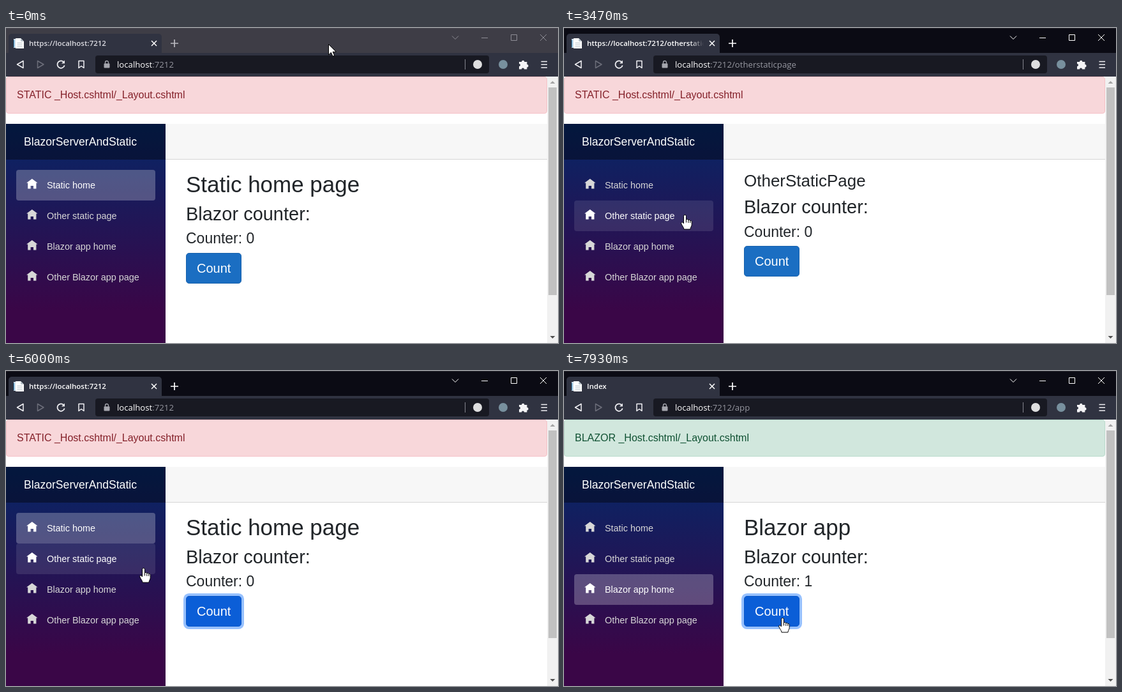
These frames come from a looping animation (865 px wide and 493 px high, 8000 ms). An HTML page:

```html
<!DOCTYPE html>
<html lang="en">
<head>
<meta charset="utf-8">
<title>Static and Blazor pages</title>
<style>
* { box-sizing: border-box; }
html, body { margin: 0; width: 100%; height: 100%; overflow: hidden; background: #fff; }
body { position: relative; font: 16px/1.5 "Liberation Sans", Arial, sans-serif; color: #212529; }
body > *, .tab, .address, .tab span, .address span { position: absolute; white-space: nowrap; }

.titlebar { left: 0; top: 0; width: 865px; height: 39px; background: #0b0b14; border-top: 1px solid #24242c; }
.toolbar { left: 0; top: 39px; width: 865px; height: 37px; background: #303341; }
.tab { left: 4px; top: 9px; width: 240px; height: 30px; border-radius: 5px 5px 0 0; background: #303341; }
.tab, .address { font-family: "Open Sans", "Noto Sans", sans-serif; color: #fff; }
.tab span { left: 32px; width: 183px; overflow: hidden; font-size: 11.5px; font-weight: 600; line-height: 30px;
  -webkit-mask: linear-gradient(90deg, #000 88%, transparent); mask: linear-gradient(90deg, #000 88%, transparent); }
.address { left: 140px; top: 43px; width: 617px; height: 28px; border-radius: 4px; background: #181922; }
.address span { left: 34px; font-size: 13.2px; line-height: 28px; }
.address i { font-style: normal; color: #9697a0; }
.focused { box-shadow: 0 0 0 1px #7c80c8; }
.idle .titlebar { background: #3e3d46; border-color: #4a4952; }
.idle .tab span { color: #dcdce2; }
.idle .caption { stroke: #8e8d95; }
.idle .plus { stroke: #bbbac1; }

.page { left: 0; top: 76px; width: 848px; height: 417px; overflow: hidden; background: #fff; }
.page > * { position: absolute; }
.alert { width: 848px; height: 58px; padding: 16px; border: 1px solid #f5c2c7; border-radius: 4px; background: #f8d7da; color: #842029; }
.alert.blazor { border-color: #badbcc; background: #d1e7dd; color: #0f5132; }
.sidebar { top: 74px; width: 250px; height: 417px; background: linear-gradient(#052767, #3a0647 70%); }
.brand { height: 56px; margin-bottom: 16px; padding-left: 28px; background: rgba(0, 0, 0, .4); color: #fff; font-size: 17.6px; line-height: 56px; }
.link { position: relative; width: 218px; height: 48px; margin-left: 16px; padding-left: 48px; border-radius: 4px; color: #d7d7d7; font-size: 14.4px; line-height: 48px; }
.link svg { position: absolute; left: 16px; top: 14px; width: 17.6px; height: 17.6px; fill: currentColor; }
.link.active { background: rgba(255, 255, 255, .25); color: #fff; }
.link.hover { background: rgba(255, 255, 255, .1); color: #fff; }
.toprow { left: 250px; top: 74px; width: 598px; height: 56px; background: #f7f7f7; border-bottom: 1px solid #d6d5d5; }
article { left: 282px; top: 147.6px; }
article div { margin-bottom: 8px; line-height: 1.2; }
.subtitle { font-size: 28.985px; }
.counter { font-size: 22.995px; }
.count { display: block; height: 48px; padding: 8px 16px; border: 1px solid; border-radius: 4.8px; color: #fff; font: 20px/1.5 "Liberation Sans", Arial, sans-serif; }
.overlay { left: 0; top: 0; }
</style>
</head>
<body>
<div class="titlebar"></div>
<div class="toolbar"></div>
<div class="tab"><span id="tabTitle"></span></div>
<div class="address"><span>localhost<i id="path"></i></span></div>

<main class="page">
  <div class="alert"></div>
  <nav class="sidebar"><div class="brand">BlazorServerAndStatic</div></nav>
  <div class="toprow"></div>
  <article>
    <div class="heading"></div>
    <div class="subtitle">Blazor counter:</div>
    <div class="counter"></div>
    <button class="count">Count</button>
  </article>
</main>

<svg class="overlay" width="865" height="493" fill="none">
  <g id="favicon">
    <path d="M12 17h8v14h-8z" fill="#c9dcea"/>
    <path d="M15 16h8l5 5v11H15z" fill="#fff"/>
    <path d="M23 16v5h5z" fill="#b9c4cc"/>
    <path d="M17.500 23.500h8m-8 3h8m-8 3h8" stroke="#b5bfc7"/>
    <path d="M12.500 19v11" stroke="#4b9ccd"/>
  </g>
  <path d="M228 20l8 8m0-8l-8 8" stroke="#fff" stroke-width="1.500"/>
  <path class="plus" d="M258 24h12m-6-6v12" stroke="#fff" stroke-width="1.700"/>
  <path class="caption" d="M699 12.500l5 5 5-5M745 15.500h10M791.500 10.500h9v9h-9zM837 10l10 10m0-10l-10 10" stroke="#fff"/>
  <g stroke="#f0f0f4" stroke-width="1.500" stroke-linejoin="round">
    <path d="M27 51.500v11l-9.500-5.500z"/>
    <path d="M49.500 51.500v11l9.500-5.500z" stroke="#6c6e7a"/>
    <path d="M91 54a5.700 5.700 0 1 0 .7 4.500" stroke-width="1.800"/>
    <path d="M92 50.500v5h-5z" fill="#f0f0f4" stroke="none"/>
    <path d="M114 51.500h8v11l-4-3-4 3z"/>
    <path d="M838.500 52.500h9.500m-9.500 4.700h9.500m-9.500 4.700h9.500"/>
  </g>
  <path d="M155.500 56v-2a2.500 2.500 0 0 1 5 0v2" stroke="#a5a6ae" stroke-width="1.300"/>
  <rect x="153.500" y="55.500" width="9" height="7" rx="1" fill="#a5a6ae"/>
  <path d="M719.500 49v16" stroke="#85868f"/>
  <circle cx="739" cy="57" r="7" fill="#dededf"/>
  <circle cx="779" cy="57" r="7" fill="#78909e"/>
  <path d="M804 53h4a2.200 2.200 0 1 1 4.400 0h4v4a2.200 2.200 0 1 1 0 4.400v3h-4.400a2 2 0 0 0-4 0h-4v-4.400a2 2 0 0 0 0-4z" fill="#f4f4f6"/>
  <path d="M848 76h17v417h-17z" fill="#f1f1f1"/>
  <path d="M850 93h13v325h-13z" fill="#c1c1c1"/>
  <path d="M852.500 87l4-4 4 4z" fill="#a3a3a3"/>
  <path d="M852.500 482l4 4 4-4z" fill="#505050"/>
  <g id="cursor" stroke-linejoin="round">
    <path id="arrow" d="M0 0v16.500l3.900-3.700 2.600 6 2.700-1.200-2.600-5.800h5.200z" fill="#fff" stroke="#000"/>
    <path id="beam" d="M-3 .5h2.500l.5.500.5-.5h2.500M0 1v16M-3 17.500h2.500l.5-.5.5.5h2.500" stroke="#fff"/>
    <g id="hand" stroke="#000">
      <path d="M-2 2a2 2 0 0 1 4 0v5.500c1-1 3-.8 3.300.8 1-.8 2.800-.5 3 .9 1-.6 2.400 0 2.400 1.500V15c0 3-2 4-2.300 7.500h-9.900C-1.800 19-5 16.500-5.800 13.500c-.6-1.800 1.600-2.800 2.500-1.500l1.300 1.500z" fill="#fff"/>
      <path d="M2 7.500V12M5.300 8.300V12.500M8.300 9.200V12.500"/>
    </g>
  </g>
</svg>

<script>
const LOOP = 8000;
const HOST = "https://localhost:7212";
const find = selector => document.querySelector(selector);

// hover and focus: when the button is entered and clicked on that page
const staticHome = { title: HOST, path: "", heading: "Static home page", size: 34.975, active: 0 };
const pages = [
  { ...staticHome, from: 0, hover: 1990, focus: 2140 },
  { from: 3330, title: HOST + "/otherstaticpage", path: "/otherstaticpage", heading: "OtherStaticPage",
    size: 25.99, active: 1, hover: 3900, focus: 4130 },
  { ...staticHome, from: 4800, hover: 4907, focus: 5490 },
  { from: 6700, title: "Index", path: "/app", heading: "Blazor app", size: 34.975, active: 2,
    hover: 7410, focus: 7690, counted: 7740, blazor: true }
];

// time, x, y of the pointer tip
const track = [
  [130, 505, 25], [470, 430, 54], [1270, 430, 54], [1800, 357, 318], [2070, 338, 370],
  [2200, 338, 370], [2850, 183, 289], [3400, 183, 289], [3980, 318, 362], [4180, 318, 362],
  [4330, 289, 338], [4620, 150, 250], [4700, 150, 250], [5000, 300, 357], [5250, 325, 372],
  [5650, 325, 372], [6000, 215, 308], [6350, 169, 334], [7270, 169, 334], [7530, 342, 386]
];

const links = ["Static home", "Other static page", "Blazor app home", "Other Blazor app page"].map(label => {
  const link = document.createElement("div");
  link.innerHTML = `<svg viewBox="0 0 8 8"><path d="M4 0L0 3h1v4h2V5h2v2h2V3h1z"/></svg>${label}`;
  find(".sidebar").append(link);
  return link;
});

const clamp = v => Math.max(0, Math.min(1, v));
const ease = v => v * v * (3 - 2 * v);
const mix = (a, b, v) => a + (b - a) * v;
const mixColor = (a, b, v) => `rgb(${a.map((c, i) => Math.round(mix(c, b[i], v)))})`;
const show = (id, on) => find(id).style.display = on ? "" : "none";

function pointerAt(t) {
  const next = track.findIndex(key => key[0] > t);
  if (next === 0) return track[0].slice(1);
  if (next < 0) return track[track.length - 1].slice(1);
  const [t0, x0, y0] = track[next - 1], [t1, x1, y1] = track[next];
  const v = ease((t - t0) / (t1 - t0));
  return [mix(x0, x1, v), mix(y0, y1, v)];
}

function drawPage(t, page) {
  find("#tabTitle").textContent = page.title;
  find("#path").textContent = ":7212" + page.path;
  find(".alert").textContent = (page.blazor ? "BLAZOR" : "STATIC") + " _Host.cshtml/_Layout.cshtml";
  find(".alert").classList.toggle("blazor", !!page.blazor);
  find(".heading").textContent = page.heading;
  find(".heading").style.fontSize = page.size + "px";
  find(".counter").textContent = "Counter: " + (t >= page.counted ? 1 : 0);

  const lit = clamp((t - page.hover) / 150), ring = ease(clamp((t - page.focus) / 150));
  const style = find(".count").style;
  style.backgroundColor = mixColor([27, 110, 194], [11, 94, 215], lit);
  style.borderColor = mixColor([24, 97, 172], [10, 88, 202], lit);
  style.boxShadow = `0 0 0 ${4 * ring}px rgba(49, 132, 253, ${.5 * ring})`;
}

function drawPointer(t, page) {
  const [x, y] = pointerAt(t), hotY = y + 3;
  const overLink = x >= 16 && x < 234 && hotY >= 222 && hotY < 414;
  const hovered = overLink ? Math.floor((hotY - 222) / 48) : -1;
  links.forEach((link, i) =>
    link.className = "link" + (i === page.active ? " active" : "") + (i === hovered ? " hover" : ""));

  const box = find(".count").getBoundingClientRect();
  const overButton = x >= box.left && x < box.right && hotY >= box.top - 1 && hotY < box.bottom;
  const overAddress = y >= 43 && y < 71, hand = overLink || overButton;
  show("#hand", hand);
  show("#beam", overAddress);
  show("#arrow", !hand && !overAddress);
  find("#cursor").setAttribute("transform", `translate(${Math.round(x) + .5} ${Math.round(y) + .5})`);
}

const start = performance.now();
function frame() {
  const t = (performance.now() - start) % LOOP;
  const page = pages.filter(p => p.from <= t).pop();
  document.body.classList.toggle("idle", t < 800);
  find(".address").classList.toggle("focused", t >= 870 && t < 1270);
  drawPage(t, page);
  drawPointer(t, page);
  requestAnimationFrame(frame);
}
frame();
</script>
</body>
</html>
```
